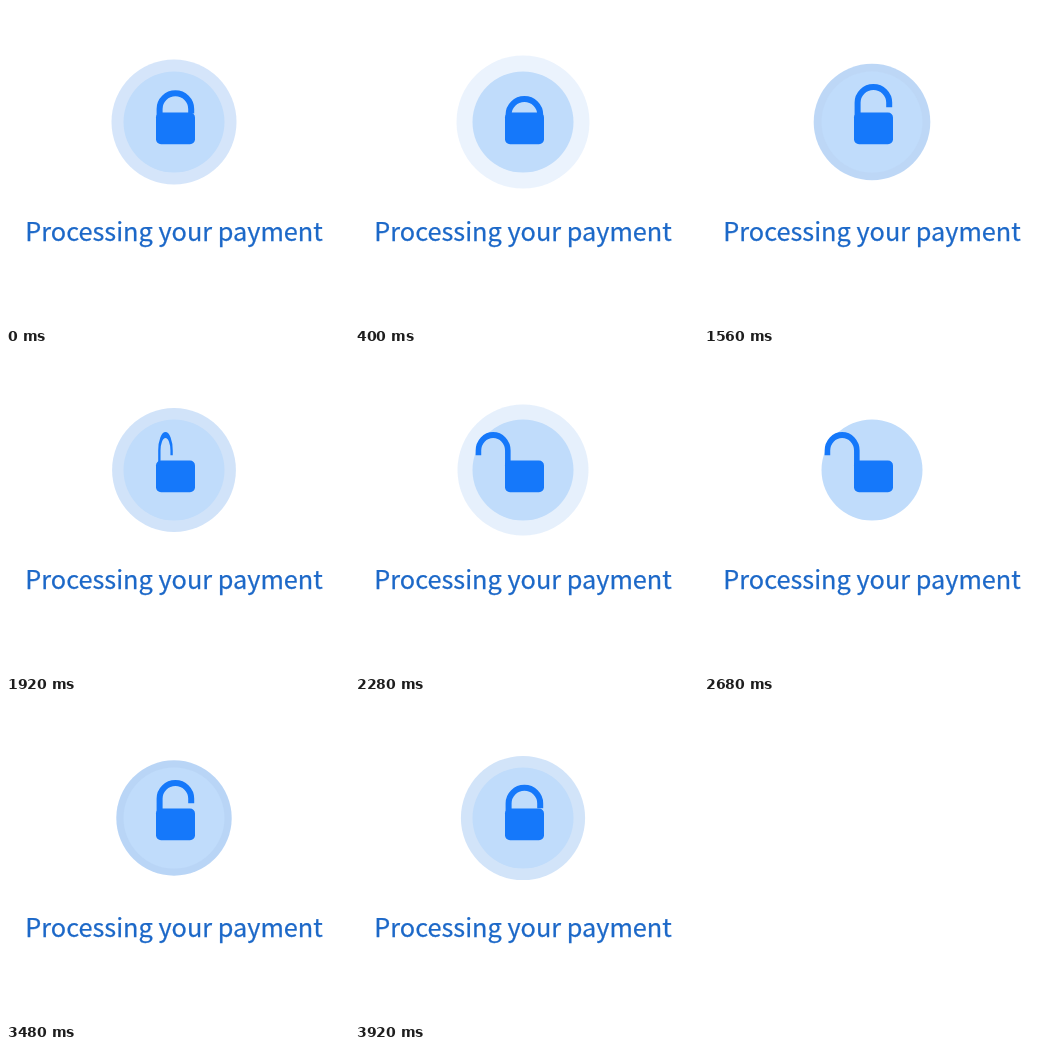
Animation of 343x320 px, one loop 3.96 s. Source, as an HTML page:

```html
<!DOCTYPE html>
<html lang="en">
<head>
<meta charset="utf-8">
<title>Processing payment</title>
<style>
  html, body { margin: 0; width: 100%; height: 100%; overflow: hidden; background: #fff; }
  svg { display: block; width: 343px; height: 320px; }
  text {
    font: 400 25.3px "Noto Sans CJK SC", "Noto Sans CJK JP", "Noto Sans CJK", sans-serif;
    fill: #1c68c8; stroke: #1c68c8; stroke-width: 0.25px;
  }
</style>
</head>
<body>
<svg viewBox="0 0 343 320">
  <circle id="ring" cx="168" cy="116" r="50" fill="#1672e0"/>
  <circle cx="168" cy="116" r="50.5" fill="#c0dcfb"/>
  <path id="shackle" d="M.4 35V18.6a15.8 15.6 0 0 1 31.6 0V23.3" fill="none" stroke="#1578fa" stroke-width="6"/>
  <rect x="150" y="106.6" width="39" height="31.6" rx="5" fill="#1578fa"/>
  <text x="19.3" y="234.8">Processing your payment</text>
</svg>
<script>
  const LOOP = 3960, PULSE = LOOP / 2, STEP = 495;
  const HINGE = 153.2, OPEN_Y = 78, DROP = 12, SWING = 1.93;
  const ring = document.getElementById("ring");
  const shackle = document.getElementById("shackle");

  // Smooth 0..1 progress of a move that begins at start
  const ease = (t, start) => {
    const u = Math.min(1, Math.max(0, (t - start) / STEP));
    return u * u * (3 - 2 * u);
  };

  function drawRing(t) {
    const age = (t - 810 + LOOP) % PULSE;
    const fade = Math.min(1, Math.max(0, (1680 - age) / 80));
    ring.setAttribute("r", 50.8 + age * 0.01);
    ring.setAttribute("fill-opacity", Math.max(0, 0.47 * (1 - age / 1900)) * fade);
  }

  function drawShackle(t) {
    const closed = ease(t, 3705 - LOOP) - ease(t, 735) + ease(t, 3705);
    const flip = 1 - SWING * (ease(t, 1735) - ease(t, 2735));
    shackle.setAttribute("transform",
      `translate(${HINGE} ${OPEN_Y + DROP * closed}) scale(${flip} 1)`);
  }

  function draw(t) {
    drawRing(t);
    drawShackle(t);
  }

  const begin = performance.now();
  function tick() {
    draw((performance.now() - begin) % LOOP);
    requestAnimationFrame(tick);
  }
  draw(0);
  requestAnimationFrame(tick);
</script>
</body>
</html>
```
